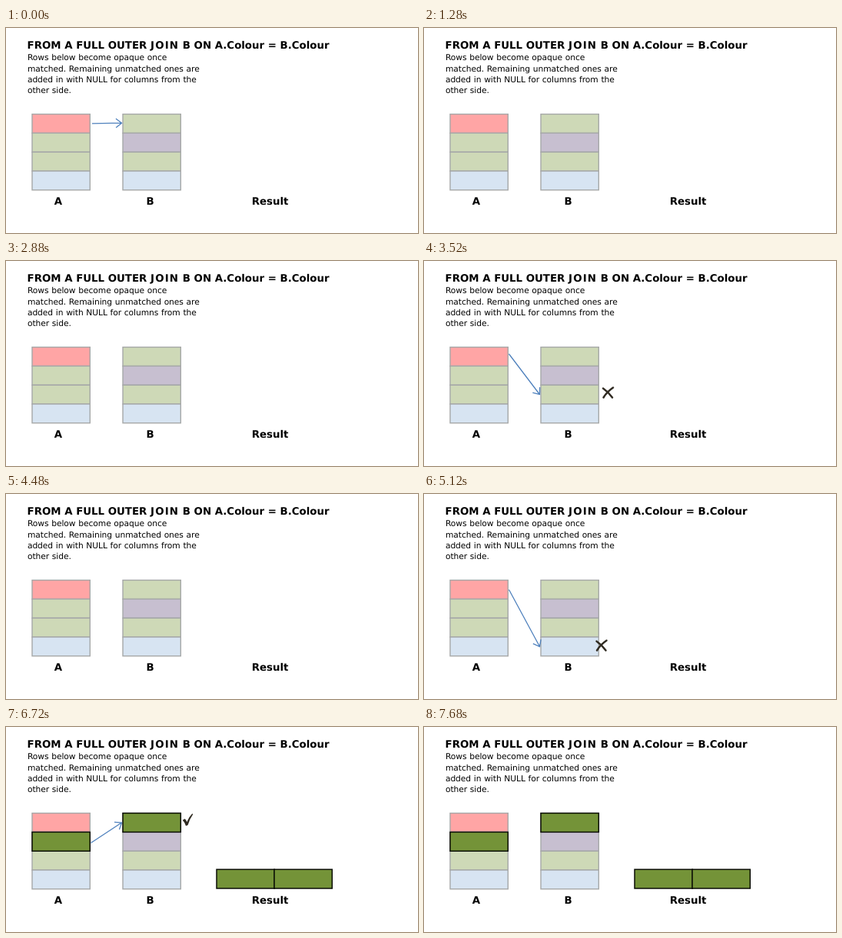
An HTML page that plays this animation: 536 px wide and 268 px high, repeating every 8000 ms.

```html
<!DOCTYPE html>
<html lang="en">
<head>
<meta charset="utf-8">
<title>Full outer join</title>
<style>
  html, body { margin: 0; width: 100%; height: 100%; overflow: hidden; background: #fff; }
  svg { display: block; width: 100vw; height: 100vh; }
  text {
    font: 10.7px "DejaVu Sans", sans-serif;
    letter-spacing: -.005em;
    word-spacing: .034em;
    text-rendering: geometricPrecision;
    fill: #000;
  }
  .bold { font-weight: bold; font-size: 13.33px; letter-spacing: 0; word-spacing: 0; }
  .wide { letter-spacing: .09em; }
  .mid { text-anchor: middle; }
  .faded rect { stroke: #a6a8a8; stroke-width: 1.4; }
  .solid rect { fill: #749338; stroke: #0a0d05; stroke-width: 1.5; }
  #arrow { fill: none; stroke: #4f81bd; stroke-width: 1.3; }
  #tick { fill: #302b22; }
  #cross { fill: none; stroke: #302b22; stroke-width: 2.5; stroke-linecap: round; }
</style>
</head>
<body>
<svg viewBox="0 0 536 268">
  <text class="bold" x="27.6" y="26.6">FROM A FULL OUTER <tspan class="wide">JOIN</tspan> B ON A.Colour = B.Colour</text>
  <text x="27.9" y="42.2">Rows below become opaque once</text>
  <text x="27.9" y="56.6">matched. Remaining unmatched ones are</text>
  <text x="27.9" y="70.9">added in with NULL for columns from the</text>
  <text x="27.9" y="85.1">other side.</text>
  <text class="bold mid" x="68" y="231">A</text>
  <text class="bold mid" x="187.5" y="231">B</text>
  <text class="bold mid" x="343.5" y="231">Result</text>
  <g id="tables" class="faded"></g>
  <g id="matched" class="solid"></g>
  <path id="arrow"/>
  <path id="cross" d="M1.5 2.5Q8 7 13.5 14.5M14.5 1.5Q6.5 7 2 14.5"/>
  <path id="tick" d="M229.7 121.8L232.8 120Q234.6 121.8 235.3 124.3Q238 117.5 242.2 113.3L243.3 114Q239 120.2 236.6 128.2L234 129.2Q232.6 124.7 229.7 121.8Z"/>
</svg>
<script>
const $ = id => document.getElementById(id);
const STEP = 1600, LOOP = 8000;
const TOP = 112.6, ROW = 24.8, W = 75.3, AX = 34, BX = 152;
const red = '#ffa5a5', green = '#ced9b7', purple = '#c7bfd0', blue = '#d7e4f2';

// Arrow tail and tip for each comparison
const arrows = [
  [112, 124.8, 150.5, 124.2],
  [110.5, 128.5, 150.5, 149.5],
  [110.5, 121.5, 150.5, 174.5],
  [110.5, 125, 150.5, 199.5],
  [110.5, 151.5, 150.5, 125]
];
const crosses = [[230, 115], [230, 139], [231.5, 164], [223, 190]];

function addRect(parent, x, y, fill) {
  const r = document.createElementNS('http://www.w3.org/2000/svg', 'rect');
  const attrs = { x, y, width: W, height: ROW };
  if (fill) attrs.fill = fill;
  for (const k in attrs) r.setAttribute(k, attrs[k]);
  parent.append(r);
}

function addTable(x, colours) {
  colours.forEach((c, i) => addRect($('tables'), x, TOP + i * ROW, c));
}

function arrowPath([x1, y1, x2, y2]) {
  const dir = Math.atan2(y2 - y1, x2 - x1);
  const barb = turn => {
    const a = dir + Math.PI + turn;
    return `${x2 + 9.5 * Math.cos(a)} ${y2 + 9.5 * Math.sin(a)}`;
  };
  return `M${x1} ${y1}L${x2} ${y2}M${barb(0.66)}L${x2} ${y2}L${barb(-0.66)}`;
}

function show(id, on) {
  $(id).style.display = on ? '' : 'none';
}

function draw(time) {
  const t = time % LOOP;
  const step = Math.floor(t / STEP);
  const local = t % STEP;
  const last = step === arrows.length - 1;
  const marked = local >= 320 && local < 1280;

  $('arrow').setAttribute('d', arrowPath(arrows[step]));
  show('arrow', local < 1280);
  show('cross', marked && !last);
  if (!last) $('cross').setAttribute('transform', `translate(${crosses[step]})`);
  show('tick', marked && last);
  show('matched', last && local >= 320);
}

addTable(AX, [red, green, green, blue]);
addTable(BX, [green, purple, green, blue]);
[[AX, TOP + ROW], [BX, TOP], [274, 186.2], [349, 186.2]]
  .forEach(([x, y]) => addRect($('matched'), x, y));

const start = performance.now();
function tick() {
  draw(performance.now() - start);
  requestAnimationFrame(tick);
}
tick();
</script>
</body>
</html>
```
